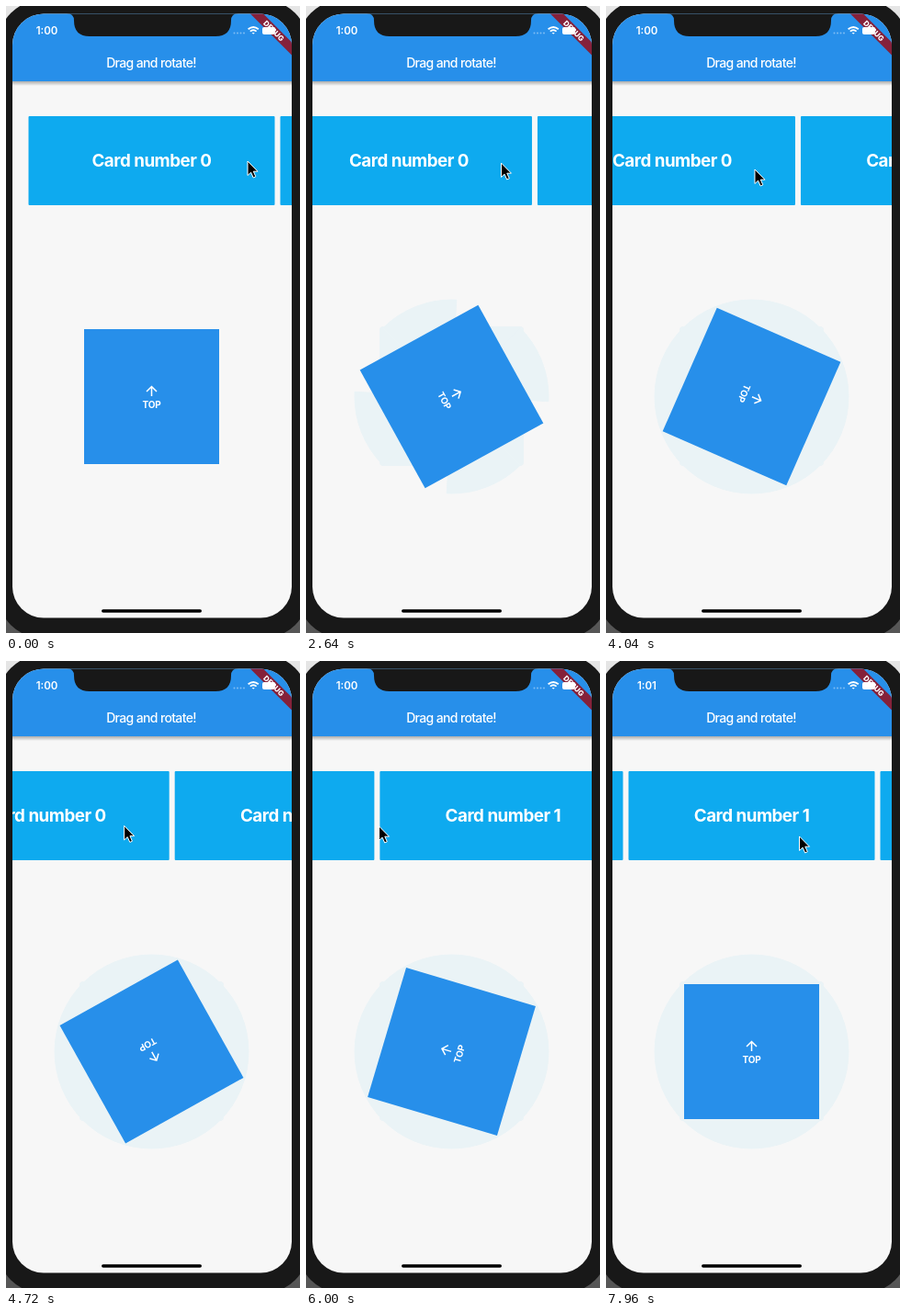
An HTML page that plays this animation: 320 px wide and 683 px high, repeating every 8000 ms.

```html
<!DOCTYPE html>
<html lang="en">
<head>
<meta charset="utf-8">
<title>Drag and rotate</title>
<style>
  html, body { margin: 0; width: 100%; height: 100%; overflow: hidden; background: #181818; }
  svg { display: block; width: 100%; height: 100%; }
  text { font-family: Inter, Roboto, sans-serif; fill: #fff; text-anchor: middle; }
  .card { font-size: 18.8px; font-weight: 700; letter-spacing: -.5px; }
</style>
</head>
<body>
<svg viewBox="0 0 320 683">
  <defs>
    <clipPath id="screen"><rect x="7" y="8.5" width="304" height="658" rx="34"/></clipPath>
    <clipPath id="tile"><path d="M82 349H235L237 351V499L235 501H82L80 499V351Z"/></clipPath>
    <linearGradient id="shade" x2="0" y2="1">
      <stop stop-color="#000" stop-opacity=".3"/>
      <stop offset="1" stop-color="#000" stop-opacity="0"/>
    </linearGradient>
    <linearGradient id="desk" x2="0" y2="1">
      <stop stop-color="#e6e6e6"/>
      <stop offset="1" stop-color="#555"/>
    </linearGradient>
  </defs>
  <rect width="320" height="683" fill="url(#desk)"/>
  <rect x="-8" y="-6" width="336" height="694" rx="46" fill="#181818"/>
  <g clip-path="url(#screen)">
    <rect x="7" y="8" width="304" height="660" fill="#f7f7f7"/>
    <rect x="7" y="82" width="304" height="5" fill="url(#shade)"/>
    <rect x="7" y="8" width="304" height="74" fill="#278fea"/>
    <text x="158" y="66.5" font-size="14" font-weight="500" letter-spacing="-.65">Drag and rotate!</text>
    <g id="cards"></g>
    <g id="trail" fill="#eaf3f6">
      <rect x="80" y="349" width="157" height="152" rx="4"/>
      <path id="sweep"/>
    </g>
    <g id="box">
      <rect x="85" y="352" width="147" height="147" fill="#278fea"/>
      <path d="M158.5 425V414.5M153 420L158.5 414.5L164 420" fill="none" stroke="#fff" stroke-width="1.5"/>
      <text x="158.5" y="438" font-size="10" font-weight="700" letter-spacing="-.1">TOP</text>
    </g>
    <path d="M66 8Q74 8 74 16Q74 33 91 33H228Q245 33 245 16Q245 8 253 8Z" fill="#181818"/>
    <text id="clock" x="44.5" y="31" font-size="11.5" font-weight="600">1:00</text>
    <g fill="#fff" fill-opacity=".4">
      <circle cx="248.5" cy="29.5" r="1"/><circle cx="252" cy="29.5" r="1"/>
      <circle cx="255.5" cy="29.5" r="1"/><circle cx="259" cy="29.5" r="1"/>
    </g>
    <g fill="none" stroke="#fff" stroke-width="1.8">
      <path d="M263.6 25.3Q269.2 20.6 274.8 25.3M265.8 27.6Q269.2 24.8 272.6 27.6"/>
      <path d="M267.6 28.9H270.8L269.2 30.8Z" fill="#fff" stroke="none"/>
    </g>
    <g transform="translate(291.5 27) rotate(45)">
      <rect x="-40" y="-5" width="80" height="10" fill="#85213a"/>
    </g>
    <rect x="279" y="23" width="14" height="8" rx="2" fill="#fff"/>
    <text transform="translate(291.5 27) rotate(45)" y="2.9" font-size="8" font-weight="800">DEBUG</text>
  </g>
  <rect x="104" y="657.2" width="109" height="3.6" rx="1.8" fill="#000"/>
  <path id="cursor" d="M0 0V15.5L3.6 12.2L6.2 18L8.8 16.8L6.3 11.2H11Z" fill="#000" stroke="#fff" stroke-width="1"/>
</svg>
<script>
const LOOP = 8000, PITCH = 274, RELEASE = 5870, CX = 158.5, CY = 425.5;
const $ = id => document.getElementById(id);

$('cards').innerHTML = [0, 1, 2].map(i => {
  const x = 24.5 + i * PITCH;
  return `<rect x="${x}" y="120" width="268" height="97" rx="1" fill="#0eaaef"/>
    <text class="card" x="${x + 134}" y="175">Card number ${i}</text>`;
}).join('');

// Monotone cubic through [time, value] points
function curve(pts) {
  const slope = pts.slice(1).map((p, i) => (p[1] - pts[i][1]) / (p[0] - pts[i][0]));
  const tan = pts.map((_, i) => {
    const a = slope[i - 1], b = slope[i];
    return a * b > 0 ? 2 * a * b / (a + b) : 0;
  });
  return t => {
    if (t <= pts[0][0]) return pts[0][1];
    const i = pts.findIndex(p => p[0] >= t) - 1;
    if (i < 0) return pts[pts.length - 1][1];
    const [t0, v0] = pts[i], [t1, v1] = pts[i + 1];
    const h = t1 - t0, u = (t - t0) / h, w = 1 - u;
    return v0 * (1 + 2 * u) * w * w + v1 * u * u * (3 - 2 * u)
      + h * u * w * (tan[i] * w - tan[i + 1] * u);
  };
}

const drag = curve([[1000, 0], [1640, 11.5], [2640, 46.5], [4040, 86.5], [5320, 141.5], [RELEASE, 163]]);
const cursorX = curve([[600, 263], [1640, 241], [2640, 212.5], [4040, 162], [5320, 99.5], [RELEASE, 79.5], [6500, 79.5], [7600, 210.5]]);
const cursorY = curve([[600, 169], [1640, 169.5], [2640, 171], [4040, 178], [5320, 180], [6500, 180], [7600, 191]]);

// Drag, then a critically damped snap to the next card
function scroll(t) {
  if (t < RELEASE) return drag(t);
  const k = (t - RELEASE) * 0.01273;
  return PITCH - (PITCH - 163) * (1 + k) * Math.exp(-k);
}

// Area passed over by the four corners
function sweepPath(deg) {
  const r = 106, span = Math.min(90, Math.max(0, deg));
  const at = a => `${CX + r * Math.cos(a * Math.PI / 180)} ${CY + r * Math.sin(a * Math.PI / 180)}`;
  return [45, 135, 225, 315].map(a =>
    `M${CX} ${CY}L${at(a)}A${r} ${r} 0 0 1 ${at(a + span)}Z`).join('');
}

function render(t) {
  const x = scroll(t), deg = x / PITCH * 360;
  $('cards').setAttribute('transform', `translate(${-x} 0)`);
  $('box').setAttribute('transform', `rotate(${deg} ${CX} ${CY})`);
  $('trail').setAttribute('visibility', deg > 1 ? 'visible' : 'hidden');
  $('sweep').setAttribute('d', sweepPath(deg - 13));
  $('cursor').setAttribute('transform', `translate(${cursorX(t)} ${cursorY(t)})`);
  $('clock').textContent = t < 7000 ? '1:00' : '1:01';
}

const start = performance.now();
function tick() {
  render((performance.now() - start) % LOOP);
  requestAnimationFrame(tick);
}
tick();
</script>
</body>
</html>
```
